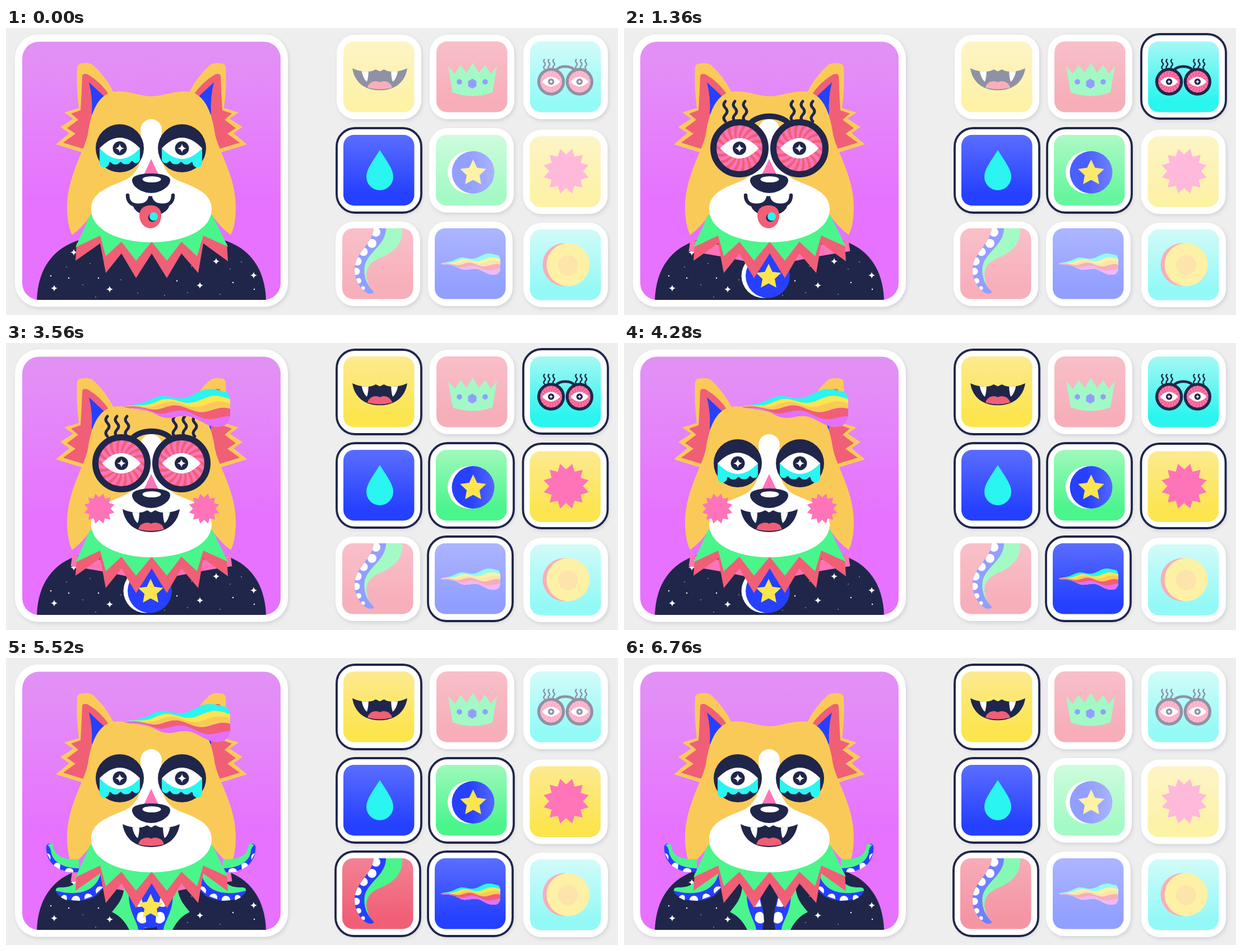
An HTML page that plays this animation: 1092x513 px, repeating every 6.8 s.

```html
<!DOCTYPE html>
<html lang="en">
<head>
<meta charset="utf-8">
<title>Avatar builder</title>
<style>
html, body { margin: 0; width: 100%; height: 100%; overflow: hidden; background: #eee; }
svg { display: block; width: 1092px; height: 513px; }
.card { fill: #fff; filter: drop-shadow(2px 3px 3px rgba(30, 35, 75, .13)); }
.ring { fill: #fff; stroke: var(--navy); stroke-width: 3.8; }
svg { --navy: #20264a; --orange: #faca58; --red: #f05f76; --blue: #2740ff; --pink: #ff74b8; --green: #4af58c; --cyan: #2af5f0; --yellow: #fce54e; --violet: #e470ff; }
.navy { fill: var(--navy); } .orange { fill: var(--orange); } .red { fill: var(--red); }
.blue { fill: var(--blue); } .pink { fill: var(--pink); } .green { fill: var(--green); }
.cyan { fill: var(--cyan); } .yellow { fill: var(--yellow); } .violet { fill: var(--violet); }
.white { fill: #fff; }
.line { fill: none; stroke: var(--navy); stroke-linecap: round; }

/* worn parts and rings switch hard, tile art fades */
.on { opacity: 0; animation: 6800ms step-end infinite; }
.lit { opacity: .5; animation: 6800ms linear infinite; }
.lit.drop, .on.drop { opacity: 1; }
.on.glasses { animation-name: glasses-on; } .lit.glasses { animation-name: glasses-lit; }
.on.medal { animation-name: medal-on; } .lit.medal { animation-name: medal-lit; }
.on.burst { animation-name: burst-on; } .lit.burst { animation-name: burst-lit; }
.on.fangs { animation-name: fangs-on; } .lit.fangs { animation-name: fangs-lit; }
.on.horn { animation-name: horn-on; } .lit.horn { animation-name: horn-lit; }
.on.tentacle { animation-name: tentacle-on; } .lit.tentacle { animation-name: tentacle-lit; }
.on.tongue { animation-name: tongue-on; }
@keyframes glasses-on { 0% { opacity: 0 } 15.294% { opacity: 1 } 62.941%, to { opacity: 0 } }
@keyframes medal-on { 0% { opacity: 0 } 18.823% { opacity: 1 } 91.176%, to { opacity: 0 } }
@keyframes burst-on { 0% { opacity: 0 } 26.47% { opacity: 1 } 81.176%, to { opacity: 0 } }
@keyframes fangs-on { 0% { opacity: 0 } 38.823%, to { opacity: 1 } }
@keyframes tongue-on { 0% { opacity: 1 } 38.823%, to { opacity: 0 } }
@keyframes horn-on { 0% { opacity: 0 } 52.352% { opacity: 1 } 94.117%, to { opacity: 0 } }
@keyframes tentacle-on { 0% { opacity: 0 } 67.058%, to { opacity: 1 } }
@keyframes glasses-lit { 0%, 15.294% { opacity: .5 } 17.058%, 62.941% { opacity: 1 } 64.705%, to { opacity: .5 } }
@keyframes medal-lit { 0%, 18.823% { opacity: .5 } 20.588%, 91.176% { opacity: 1 } 92.352%, to { opacity: .5 } }
@keyframes burst-lit { 0%, 26.47% { opacity: .5 } 28.235%, 81.176% { opacity: 1 } 82.941%, to { opacity: .5 } }
@keyframes fangs-lit { 0%, 38.823% { opacity: .5 } 40%, to { opacity: 1 } }
@keyframes horn-lit { 0%, 52.352% { opacity: .5 } 54.117%, 94.117% { opacity: 1 } 95.882%, to { opacity: .5 } }
@keyframes tentacle-lit { 0%, 67.058% { opacity: .5 } 68.823%, 98.235% { opacity: 1 } to { opacity: .5 } }
</style>
</head>
<body>
<svg viewBox="0 0 1092 513">
<defs>
  <linearGradient id="sky" x2="0" y2="1"><stop stop-color="#e192f4"/><stop offset=".15" stop-color="#e48bf8"/><stop offset=".62" stop-color="#e672ff"/></linearGradient>
  <linearGradient id="moon"><stop offset=".4" stop-color="#2740ff"/><stop offset="1" stop-color="#5468ff"/></linearGradient>
  <clipPath id="frame"><rect x="29" y="24.500" width="461" height="461.500" rx="30"/></clipPath>

  <path id="sparkle" class="white" d="M0-8Q1-1 8 0Q1 1 0 8Q-1 1-8 0Q-1-1 0-8"/>
  <g id="eye">
    <path class="white" d="M-36 0Q0-38 36 0Q0 38-36 0"/>
    <circle class="navy" r="12.500"/><use href="#sparkle"/>
  </g>
  <polygon id="burst-art" class="pink"/>
  <polygon id="star" class="yellow"/>

  <g id="fangs-art">
    <clipPath id="jaw"><path id="jaw-shape" d="M-51 0Q-36 7-20 6Q-12 5-8 2Q-4 3-2 5Q0 6 2 5Q4 3 8 2Q12 5 20 6Q36 7 51 0C47 27 27 41 0 41S-47 27-51 0Z"/></clipPath>
    <use href="#jaw-shape" class="navy"/>
    <g clip-path="url(#jaw)">
      <path class="white" d="M-34 4Q-31 20-24 25Q-21 17-21 4ZM34 4Q31 20 24 25Q21 17 21 4Z"/>
      <path class="red" d="M-23 36Q-20 25-8 24Q-3 24 0 26Q3 24 8 24Q20 25 23 36Q0 42-23 36Z"/>
    </g>
  </g>

  <path id="lash" class="line" stroke-width="5" d="M0 131c-4 4-4 8 0 12s4 8 0 12s-4 8 0 12"/>
  <g id="lens">
    <circle class="pink" r="46"/>
    <path id="rays" class="red"/>
    <circle class="line" r="46.500" stroke-width="11"/>
    <use href="#eye" transform="scale(.96)"/>
  </g>
  <g id="glasses-art">
    <use href="#lash" x="181"/><use href="#lash" x="198"/><use href="#lash" x="216"/>
    <use href="#lash" x="301"/><use href="#lash" x="319"/><use href="#lash" x="337"/>
    <path class="line" stroke-width="10" d="M224 172C238 153 281 153 295 172"/>
    <use href="#lens" x="206" y="215"/><use href="#lens" x="313" y="215"/>
  </g>

  <clipPath id="horn-end"><rect x="150" y="80" width="250" height="72" rx="24"/></clipPath>
  <g id="horn-art" clip-path="url(#horn-end)"></g>

  <clipPath id="arm"><path id="arm-shape" d="M656 358C655 385 622 402 622 432C622 457 640 475 650 475Q657 475 656 471C645 460 637 445 640 425C646 400 678 388 678 358Z"/></clipPath>
  <g id="tentacle-art">
    <path class="green" d="M677 358H707C709 387 690 402 665 412C645 421 640 436 645 452Q648 464 656 472L645 466Q632 440 640 420C648 398 677 388 677 358Z"/>
    <use href="#arm-shape" class="blue"/>
    <g class="white" clip-path="url(#arm)"><circle cx="660" cy="365" r="8"/><circle cx="653" cy="385" r="8"/><circle cx="638" cy="400" r="7.500"/><circle cx="627" cy="417" r="7.500"/><circle cx="625" cy="435" r="6.500"/><circle cx="629" cy="452" r="5"/><circle cx="637" cy="465" r="3.500"/></g>
  </g>

  <g id="medal-art">
    <circle class="white" cx="826" cy="258" r="38"/><circle fill="url(#moon)" cx="833.500" cy="258" r="38"/>
    <use href="#star" x="833.500" y="259.500"/>
  </g>
  <g id="crown-art">
    <path class="green" d="M789 68L801 82L811 66L822 80L833 62L844 80L855 66L865 82L876 68L868 115Q833 128 797 115Z"/>
    <path class="blue" d="M832 90.500l7.500 4.500v9l-7.500 4.500l-7.500-4.500v-9zM809 91l4.500 2.500v5.500l-4.500 2.500l-4.500-2.500v-5.500zM855 91l4.500 2.500v5.500l-4.500 2.500l-4.500-2.500v-5.500z"/>
  </g>
  <path id="drop-art" class="cyan" d="M667 218C655 238 643 252 643 266A24 24 0 0 0 691 266C691 252 679 238 667 218Z"/>
  <g id="coin-art">
    <circle class="red" cx="996" cy="423" r="38.500"/><circle class="yellow" cx="1003" cy="423" r="38.500"/>
    <circle class="orange" cx="1003" cy="424" r="18"/>
  </g>
</defs>

<rect class="card" x="16" y="11.500" width="487" height="487" rx="42"/>
<g clip-path="url(#frame)">
  <rect x="29" y="24" width="461" height="462" fill="url(#sky)"/>
  <path class="navy" d="M55 486C57 432 82 393 134 378H385C437 393 462 432 464 486Z"/>
  <g id="night"></g>

  <g id="ear">
    <path class="orange" d="M127 70Q128 63 138 63Q150 62 156 67Q178 87 192 115L170 215L135 222L89 208L113 188L97 177L120 162L104 151L130 143Q125 105 127 70Z"/>
    <path class="red" d="M136 86Q137 80 146 83Q170 97 186 122L165 210L138 216L102 205L124 189L109 179L129 164L116 153L133 147Q135 115 136 86Z"/>
    <path class="blue" d="M148 97L176 123L160 160L153 153Q155 125 148 97Z"/>
  </g>
  <use href="#ear" transform="matrix(-1 0 0 1 519 0)"/>
  <path class="orange" d="M191 114C216 110 238 122 259.500 122S303 110 328 114C357 120 368 155 373 190C379 220 410 265 410 320Q410 352 401 370Q384 358 367 334H152Q135 358 118 370Q109 352 109 320C109 265 140 220 146 190C151 155 162 120 191 114Z"/>

  <g class="on medal">
    <path fill="none" stroke="var(--pink)" stroke-width="20" d="M117 389Q180 398 259 416Q338 398 402 389"/>
    <circle class="white" cx="249" cy="443" r="39.500"/><circle class="blue" cx="256.500" cy="443" r="39.500"/>
  </g>
  <g class="on tentacle">
    <g id="arms">
      <path class="blue" d="M72 343Q70 333 77 332Q84 331 85 340C87 360 105 368 130 369V383C96 384 74 370 72 343Z"/>
      <path class="green" d="M74 335Q83 328 85 338C88 356 105 360 130 360V376C100 375 82 364 80 344Q78 336 74 335Z"/>
      <path class="white" d="M73 349q8 1 6 12zM85 371q4-9 12-2l-1 9zM105 382q1-8 11-6q5 2 4 7z"/>
      <path class="blue" d="M88 415Q94 433 128 434C162 433 178 415 179 385H145Q140 412 88 415Z"/>
      <path class="green" d="M89 416Q88 409 98 410C122 410 130 400 130 380H170C164 417 130 427 89 416Z"/>
      <path class="white" d="M98 428q3-6 9-4q3 4 1 9zM117 433q0-8 9-8q7 2 6 9zM140 431q-1-9 6-10q7 1 8 5zM161 421q-3-8 3-12q6-2 9 1z"/>
      <path class="blue" d="M215 395H244Q240 418 246 440Q252 465 247 486H224Q216 450 215 395Z"/>
      <path class="green" d="M211 396C213 428 200 440 189 454C202 460 212 470 220 486H236C234 466 212 450 221 396Z"/>
      <path class="white" d="M242 430a8 8 0 0 0-14 6q2 8 8 9l9-1zM249 458a8 8 0 0 0-15 3q-2 8 3 11q6 5 13 0z"/>
    </g>
    <use href="#arms" transform="matrix(-1 0 0 1 517 0)"/>
  </g>
  <g class="on medal"><use href="#star" transform="translate(258 445) scale(.96)"/></g>

  <path class="red" d="M126 385L124 416L168 385L178 438L206 403L232 447L260 403L287 447L313 403L343 438L352 385L396 417L394 385L340 360H180Z"/>
  <path class="green" d="M150 334L124 392L168 371L178 408L206 382L232 416L260 382L287 416L313 382L341 408L352 371L396 391L368 334Z"/>

  <path class="white" d="M240 182a19 19 0 0 1 38 0C276 215 272 245 296 266C313 280 367 285 367 324C367 360 319 383 259.500 383S152 360 152 324C152 285 205 280 222 266C247 245 242 215 240 182Z"/>
  <g id="teary">
    <circle class="navy" cx="203" cy="215" r="43"/>
    <path class="cyan" transform="translate(203 215)" d="M-36 0V26a8.500 8.500 0 0 0 17 0q1-3 4 0a8 6 0 0 0 14 0q3-3 4-1a9 6 0 0 0 17-1q2-2 3-1a7 7 0 0 0 13-3V0Z"/>
    <use href="#eye" x="203" y="215"/>
  </g>
  <use href="#teary" transform="matrix(-1 0 0 1 517 0)"/>
  <path class="pink" d="M259 234L273 264H245Z"/>
  <path class="navy" d="M225 272C225 263 243 260 259 260S293 263 293 272C293 284 275 295 259 295S225 284 225 272Z"/>
  <ellipse class="white" cx="260" cy="270.500" rx="16.500" ry="5.500"/>

  <g class="on tongue">
    <path class="navy" d="M226 316C232 342 286 342 292 316Q268 322 258 310Q248 322 226 316Z"/>
    <path class="line" stroke-width="6.500" d="M217 299C217 311 225 317 236 317Q255 317 257.500 301Q260 317 280 317C291 317 298 311 298 299"/>
    <path class="red" d="M238 335C238 322 248 317 258 317S277 322 277 335C277 349 268 358 258 358S238 349 238 335Z"/>
    <circle class="navy" cx="261" cy="339" r="7.500"/><circle class="cyan" cx="263.500" cy="337" r="7.500"/>
  </g>
  <g class="on fangs"><use href="#fangs-art" x="259" y="297"/></g>
  <g class="on burst">
    <use href="#burst-art" transform="translate(166.500 296) scale(.67)"/>
    <use href="#burst-art" transform="translate(353.500 296) scale(.67)"/>
  </g>
  <g class="on glasses"><use href="#glasses-art"/></g>
  <g class="on horn"><use href="#horn-art"/></g>
</g>
<g id="tiles"></g>
</svg>
<script>
const $ = id => document.getElementById(id);
const polar = (r, a) => [r * Math.cos(a), r * Math.sin(a)].map(v => v.toFixed(2)).join(' ');

// n-pointed star outline; the first tip is at angle a
const starPoints = (n, outer, inner, a) =>
  Array.from({ length: 2 * n }, (_, i) => polar(i % 2 ? inner : outer, a + i * Math.PI / n)).join(' ');
$('burst-art').setAttribute('points', starPoints(12, 41.5, 30, Math.PI / 12));
$('star').setAttribute('points', starPoints(5, 24.5, 12, -Math.PI / 2));

// curved rays inside each lens
$('rays').setAttribute('d', Array.from({ length: 18 }, (_, i) => {
  const a = i * Math.PI / 9, w = Math.PI / 20;
  return `M0 0Q${polar(28, a - .35)} ${polar(43, a)}L${polar(43, a + w)}Q${polar(28, a + w - .35)} 0 0Z`;
}).join(''));

// edge k of the horn, from its top (0) to its bottom (1)
const hornEdge = k => Array.from({ length: 65 }, (_, i) => {
  const u = i / 64;
  const wave = 5 * Math.min(1, 3 * u) * Math.cos(2 * Math.PI * (u - .32 - .28 * k) / .45);
  const y = 115 - 33 * (1 - k) * u ** .7 + 35 * k * u - wave;
  return `${(211 + 192 * u).toFixed(1)} ${y.toFixed(1)}`;
});
const hornBottom = hornEdge(1).reverse();
$('horn-art').innerHTML = [['cyan', 0], ['yellow', .23], ['orange', .4], ['red', .58], ['violet', .8]]
  .map(([tone, k]) => `<polygon class="${tone}" points="${hornEdge(k).concat(hornBottom).join(' ')}"/>`).join('');

const sparkles = [[121, 401], [86, 465], [185, 467], [375, 417], [442, 442], [346, 460]];
const dots = [[80, 443], [108, 427], [137, 459], [165, 447], [150, 421], [160, 481], [112, 447], [205, 450], [235, 474],
  [305, 452], [324, 473], [382, 476], [405, 455], [420, 418], [400, 431], [443, 467], [283, 478], [331, 426]];
$('night').innerHTML =
  sparkles.map(([x, y]) => `<use href="#sparkle" transform="translate(${x} ${y}) scale(.75)"/>`).join('') +
  dots.map(([x, y], i) => `<circle class="white" cx="${x}" cy="${y}" r="${i % 3 ? .7 : 1.2}"/>`).join('');

const paints = {
  lemon: ['#fcea90', '#fce54e'], rose: ['#f38295', '#f05f76'], aqua: ['#a6f8f4', '#2af5ee'],
  royal: ['#5a6dff', '#2540ff'], mint: ['#9ff9bc', '#4af58c']
};
// name, corner of the art, top of the ring, paint, placement of the art
const tiles = [
  ['fangs', 602, 24, 12, 'lemon', 'translate(667 72) scale(.96)'],
  ['crown', 768, 24, 12, 'rose'],
  ['glasses', 935, 24, 11, 'aqua', 'translate(875 -5.9) scale(.474)'],
  ['drop', 602, 191, 179, 'royal'],
  ['medal', 767, 191, 179, 'mint'],
  ['burst', 934.5, 193.5, 180, 'lemon', 'translate(999.5 256)'],
  ['tentacle', 600, 358, 346, 'rose'],
  ['horn', 765, 358, 346, 'royal', 'translate(656.8 356.8) scale(.563)'],
  ['coin', 935, 360, 348, 'aqua']
];
const gradients = Object.entries(paints).map(([id, [top, end]]) =>
  `<linearGradient id="${id}" x2="0" y2="1"><stop stop-color="${top}"/><stop offset=".85" stop-color="${end}"/></linearGradient>`);
const tile = ([id, x, y, ringY, paint, move = '']) => {
  const box = `x="${x - 12}" width="151" height="151" rx="33"`;
  return `<rect class="card" y="${y - 12}" ${box}/><g class="on ${id}"><rect class="ring" y="${ringY}" ${box}/></g>
    <g class="lit ${id}"><rect x="${x}" y="${y}" width="126.5" height="126.5" rx="19" fill="url(#${paint})"/>
    <use href="#${id}-art" transform="${move}"/></g>`;
};
$('tiles').innerHTML = gradients.join('') + tiles.map(tile).join('');
</script>
</body>
</html>
```
